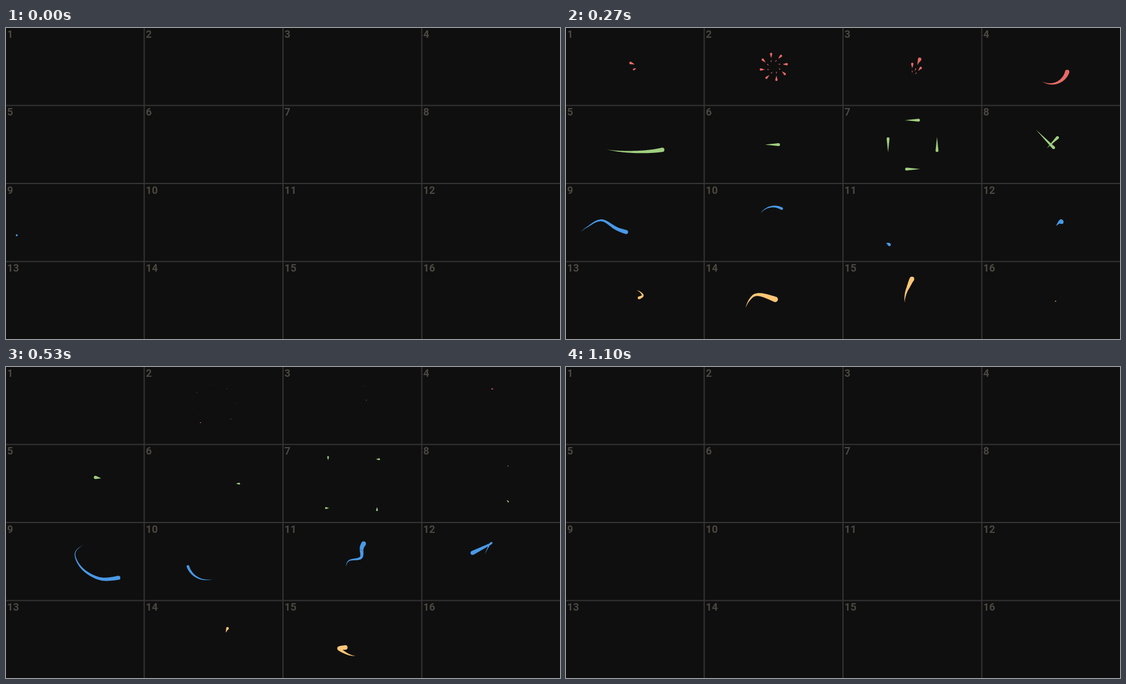
Animation, 960 px wide and 540 px high, one loop 1.41 s. Source, as an HTML page with a canvas:

```html
<!DOCTYPE html>
<html lang="en">
<head>
<meta charset="utf-8">
<title>Sixteen stroke effects</title>
<style>
html, body { margin: 0; width: 100%; height: 100%; overflow: hidden; background: #0f0f0f; }
canvas { display: block; }
</style>
</head>
<body>
<canvas id="stage" width="960" height="540"></canvas>
<script>
const ctx = document.getElementById('stage').getContext('2d');
const LOOP = 1410, LAST = 33, SAMPLES = 64;
const RED = '#e86a66', GREEN = '#a0cf7f', BLUE = '#4a99e6', YELLOW = '#fdc676';
const strokes = [];
const rad = deg => deg * Math.PI / 180;
const clamp = (v, lo, hi) => Math.max(lo, Math.min(hi, v));
const mix = (a, b, f) => a + (b - a) * f;

// Easing: functions from a step to progress 0..1
const progress = (n, start, end) => clamp((n - start) / (end - start), 0, 1);
const out = (start, end, power) => n => 1 - (1 - progress(n, start, end)) ** power;
const swing = (start, end) => n => {
  const t = progress(n, start, end);
  return t ** 3 / (t ** 3 + (1 - t) ** 3);
};

// Paths: functions from progress to a point
const line = (x, y, deg, from, to) => f =>
  [x + Math.cos(rad(deg)) * mix(from, to, f), y + Math.sin(rad(deg)) * mix(from, to, f)];

// A line passing the centre at a distance
const spoke = (x, y, gap, deg, from, to) =>
  line(x + gap * Math.sin(rad(deg)), y - gap * Math.cos(rad(deg)), deg, from, to);

// Counterclockwise from the top
const oval = (x, y, rx, ry, from, to) => f => {
  const a = rad(mix(from, to, f));
  return [x - rx * Math.sin(a), y - ry * Math.cos(a)];
};

// Clockwise from the bottom, the second turn wider
const orbit = (x, y, turn) => f => {
  const a = mix(10, turn, f);
  const r = 28 + 20 * Math.exp(-(((a - 518) / 130) ** 4));
  return [x - r * Math.sin(rad(a)), y + r * Math.cos(rad(a))];
};

// Smooth curve through the points, travelled at even speed
function spline(...pts) {
  const at = i => pts[clamp(i, 0, pts.length - 1)];
  const point = u => {
    const i = Math.min(pts.length - 2, Math.floor(u)), t = u - i;
    return [0, 1].map(k => {
      const a = at(i - 1)[k], b = at(i)[k], c = at(i + 1)[k], d = at(i + 2)[k];
      return b + t / 2 * (c - a + t * (2 * a - 5 * b + 4 * c - d + t * (3 * (b - c) + d - a)));
    });
  };
  const steps = 300, dots = [], dist = [0];
  for (let i = 0; i <= steps; i++) {
    dots.push(point(i / steps * (pts.length - 1)));
    if (i) dist.push(dist[i - 1] + Math.hypot(dots[i][0] - dots[i - 1][0], dots[i][1] - dots[i - 1][1]));
  }
  return f => {
    const s = f * dist[steps];
    let i = 1;
    while (i < steps && dist[i] < s) i++;
    const t = (s - dist[i - 1]) / (dist[i] - dist[i - 1] || 1);
    return [0, 1].map(k => mix(dots[i - 1][k], dots[i][k], t));
  };
}

const add = (color, width, path, head, tail, least = .5) =>
  strokes.push({ color, width, path, head, tail, least });

// A drop thrown outwards, with a thin trace left behind
function drop(x, y, gap, deg, reach, width) {
  add(RED, width, spoke(x, y, gap, deg, 0, reach), out(0, 17, 1.4), out(4, 17, 1.4));
  add(RED, 1.4, spoke(x, y, gap, deg, .08 * reach, .32 * reach), out(5, 10, 2), out(7, 10, 1.5));
}

const early = [out(0, 17.6, 2), out(5, 18, 2)];
const dash = [out(2.7, 17.5, 2), out(4.8, 18, 1.4)];
const spit = [out(0, 11, 2.5), out(4, 11, 1)];

// 1-4, red
add(RED, 6, line(130, 67, 199, 0, 20), ...spit);
add(RED, 5, line(129, 67.5, 159, 0, 13), ...spit);
for (let k = 0; k < 8; k++) drop(360, 67.5, 4.6, 45 * k, 38, 4.5);
drop(600, 86, 0, -90, 40, 4.2);
drop(600, 86, 0, -68, 58, 6);
drop(600, 86, 0, -48.6, 38, 4.2);
add(RED, 7.5, oval(840.5, 67.5, 29.3, 29.5, 0, 360), ...early);

// 5-8, green
add(GREEN, 7.5, oval(120, 202.5, 65.5, 12.7, 15, 332), out(0, 17.6, 1.8), out(4.7, 18, 1.6));
add(GREEN, 5, line(358, 202.5, 0, -42, 47), ...dash);
for (let a = 0; a < 360; a += 90) add(GREEN, 5, spoke(600.5, 202.5, 42.4, a, -42, 47), ...dash);
add(GREEN, 5, line(808, 170, 45.7, 0, 90), dash[0], swing(1.5, 21.5));
add(GREEN, 5, line(807, 235, -45, 0, 90), ...early);

// 9-12, blue
add(BLUE, 7, spline([18.5, 360], [36, 346], [62, 334], [94, 351], [145, 361], [181, 337], [171, 314],
  [145, 305], [120, 322], [132, 350], [165, 368], [206, 364]), swing(-1.5, 21.5), swing(3, 26.5), 3.4);
add(BLUE, 4.6, orbit(360, 338, 733), out(2, 33, 1.5), out(4.5, 33, 1.3));
add(BLUE, 8, spline([554, 372], [562, 376.5], [577, 372], [587, 352], [594, 336.5], [615, 331], [617, 312],
  [630, 296], [649, 295.5], [653, 297]), swing(1, 26.5), swing(3, 32), 5);
add(BLUE, 7, spline([846, 347], [858, 335.5], [857, 351], [844, 355], [832, 348], [828, 331], [838, 308],
  [838, 308], [792, 331]), swing(0, 24), swing(1.3, 30.5));

// 13-16, yellow
add(YELLOW, 5, spline([112, 565], [97.5, 492], [104, 468], [122, 456], [133, 464], [126, 469]),
  out(0, 14, 6), swing(.7, 12.2));
add(YELLOW, 9.5, spline([277, 532], [301, 507], [318, 472], [336, 463], [378, 476], [379, 466], [385, 451]),
  out(2.3, 27, 5), out(6, 27, 4.2));
add(YELLOW, 8, spline([588.5, 482], [587, 470], [592, 452], [605, 432.5], [615, 480], [611, 499], [596, 500],
  [577, 489], [589, 487]), swing(0, 19), swing(2.5, 25.5));
add(YELLOW, 2, line(815, 470, 7.5, 0, 34), out(0, 9, 3), out(2, 9, 1.5));

function drawGrid() {
  ctx.fillStyle = '#0f0f0f';
  ctx.fillRect(0, 0, 960, 540);
  ctx.fillStyle = '#353535';
  for (const x of [239.5, 480, 720.5]) ctx.fillRect(x - 1, 0, 2, 540);
  for (const y of [134.5, 270, 405.5]) ctx.fillRect(0, y - 1, 960, 2);
  ctx.fillStyle = '#4b4740';
  ctx.font = '700 18px Roboto, sans-serif';
  for (let i = 0; i < 16; i++) {
    ctx.fillText(i + 1, 2 + 240.3 * (i % 4), 17 + 135.4 * Math.floor(i / 4));
  }
}

// A ribbon growing from nothing at the tail to a round head; short ribbons are thin
function drawStroke(s, n) {
  const head = s.head(n), tail = s.tail(n);
  if (head <= 0 || tail >= 1) return;
  const pts = [];
  let length = 0;
  for (let i = 0; i <= SAMPLES; i++) {
    const [x, y] = s.path(mix(tail, head, i / SAMPLES));
    const step = i ? Math.hypot(x - pts[i - 1].x, y - pts[i - 1].y) : 0;
    length += step;
    pts.push({ x, y, step });
  }
  const radius = clamp(.5 + length / 2, s.least, s.width) / 2;
  ctx.beginPath();
  pts.forEach(({ x, y, step }, i) => {
    const r = radius * i / SAMPLES;
    if (step) {
      const p = pts[i - 1], pr = radius * (i - 1) / SAMPLES;
      const nx = (y - p.y) / step, ny = (p.x - x) / step;
      ctx.moveTo(p.x + nx * pr, p.y + ny * pr);
      ctx.lineTo(x + nx * r, y + ny * r);
      ctx.lineTo(x - nx * r, y - ny * r);
      ctx.lineTo(p.x - nx * pr, p.y - ny * pr);
      ctx.closePath();
    }
    ctx.moveTo(x + r, y);
    ctx.arc(x, y, r, 0, 2 * Math.PI);
  });
  ctx.fillStyle = s.color;
  ctx.fill();
}

function frame() {
  // Thirty steps a second, rounded to 10 ms
  const tick = Math.floor(performance.now() % LOOP / 10);
  const n = Math.min(LAST, Math.ceil((tick + .5) * .3) - 1);
  drawGrid();
  for (const s of strokes) drawStroke(s, n);
  requestAnimationFrame(frame);
}
frame();
</script>
</body>
</html>
```
